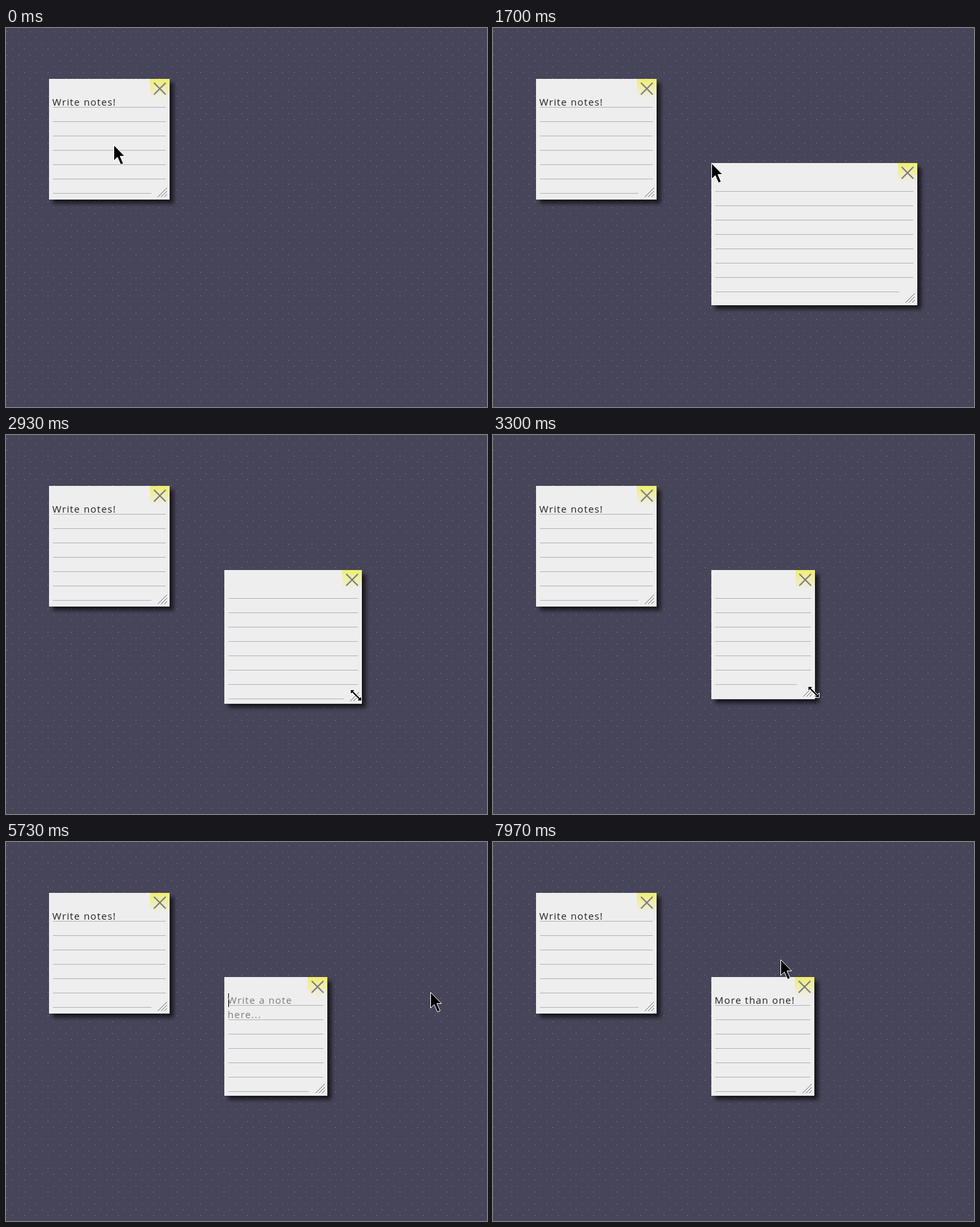
Write an HTML page that moves like this. It is 738 px wide and 581 px high and loops after 8000 ms.

```html
<!DOCTYPE html>
<html lang="en">
<head>
<meta charset="utf-8">
<title>Sticky notes</title>
<style>
  html, body { margin: 0; width: 100%; height: 100%; overflow: hidden; }
  body {
    position: relative;
    background-color: #474559;
    background-image: conic-gradient(#77758a 25%, transparent 0), conic-gradient(#77758a 25%, transparent 0);
    background-image:
      linear-gradient(#7d7b8c, #7d7b8c), linear-gradient(#7d7b8c, #7d7b8c);
    background: #474559;
  }
  #dots, #cursor { position: absolute; left: 0; top: 0; width: 738px; height: 581px; }
  .note {
    position: absolute;
    background: #eee;
    box-shadow: 6px 6px 6px rgba(0, 0, 0, .65);
  }
  .note > * { position: absolute; }
  .rules {
    left: 6px; right: 6px; top: 22px; bottom: 6px;
    background: linear-gradient(transparent 21px, #b3b3bd 21px) 0 0 / 100% 22px;
  }
  .close { right: 0; top: 0; width: 30px; height: 30px; background: linear-gradient(#f0ee70, #eee); }
  .grip { right: 0; bottom: 0; width: 28px; height: 28px; background: #eee; }
  .close path { stroke: #7b7a88; stroke-width: 2; }
  .grip path { stroke: #6f6e7e; stroke-width: 1; }
  .text {
    left: 5px; top: 24px;
    font: 15px/22px "Open Sans", "Noto Sans", sans-serif;
    letter-spacing: 1.15px; white-space: pre; color: #222;
  }
  .hint { color: #7c7c7c; }
  .caret {
    display: inline-block; vertical-align: top;
    width: 1px; height: 21px; margin: 1px -2px 0 1px; background: #000;
  }
</style>
</head>
<body>
<svg id="dots">
  <defs>
    <pattern id="dot" width="18" height="18" patternUnits="userSpaceOnUse">
      <path d="M1 5h1v1h-1zM10 14h1v1h-1z" fill="#858394"/>
    </pattern>
  </defs>
  <rect width="738" height="581" fill="url(#dot)"/>
</svg>

<template id="noteParts">
  <div class="rules"></div>
  <svg class="close"><path d="M6 6L24 24M24 6L6 24"/></svg>
  <svg class="grip"><path d="M10 24L24 10M15 24L24 15M20 24L24 20"/></svg>
  <div class="text"><span class="typed"></span><span class="caret"></span><span class="hint"></span></div>
</template>

<svg id="cursor">
  <g id="pointer">
    <path id="arrow" fill="#000" stroke="#fff"
      d="M.5 .5V24.5L6 19.2L11 30.5L15 28.8L10.2 17.6H17.2Z"/>
    <path id="resize" fill="#000" stroke="#fff"
      d="M-8.5 -8.5H-1.5L-4 -6L6 4L8.5 1.5V8.5H1.5L4 6L-6 -4L-8.5 -1.5Z"/>
    <path id="beam" fill="none" stroke="#000"
      d="M-5 -12.5H-1L.5 -11.5L2 -12.5H6M.5 -11.5V11.5M-5 12.5H-1L.5 11.5L2 12.5H6"/>
  </g>
</svg>

<script>
const LOOP = 8000, STEP = 100 / 3;
const $ = id => document.getElementById(id);

// Cursor moves: start, end, waypoints evenly spaced in time.
const moves = [
  [0, 170, [[165, 179], [204, 219]]],
  [737, 1570, [[204, 219], [240, 262], [310, 310], [365, 322], [376, 290], [358, 235], [335, 207]]],
  [1740, 2370, [[335, 207], [390, 262], [520, 345], [625, 395], [657, 412], [650, 413.4]]],
  [2500, 3300, [[650, 413.4], [602, 409], [545, 401], [502, 391], [492, 394]]],
  [3300, 3330, [[492, 394], [492, 391]]],
  [3330, 4170, [[492, 391], [491, 380], [489, 377.6], [482, 368], [445, 320], [394, 262], [387, 249]]],
  [4840, 5000, [[387, 251], [480, 238], [600, 240], [651, 230]]],
  [7470, 7970, [[651, 230], [610, 212], [550, 185], [490, 166], [455, 166], [441, 180]]]
];

const message = "More than one!";
const keyTimes = [5830, ...Array.from({ length: 11 }, (_, i) => 6130 + 77 * i), 7000, 7270];

const within = (t, a, b) => t >= a && t < b;

function spline(points, u) {
  const last = points.length - 1;
  const i = Math.min(last - 1, Math.floor(u * last));
  const f = u * last - i;
  const at = k => points[Math.max(0, Math.min(last, k))];
  const [a, b, c, d] = [at(i - 1), at(i), at(i + 1), at(i + 2)];
  return [0, 1].map(n => b[n] + f / 2 * (c[n] - a[n]
    + f * (2 * a[n] - 5 * b[n] + 4 * c[n] - d[n]
    + f * (3 * (b[n] - c[n]) + d[n] - a[n]))));
}

function cursorAt(t) {
  const [start, end, points] = moves.filter(m => t >= m[0]).pop();
  return spline(points, Math.min(1, (t - start) / (end - start)));
}

function cursorKind(t) {
  if (within(t, 2900, 3320) || within(t, 3420, 3640)) return "resize";
  if (within(t, 4330, 4465)) return "none";
  if (within(t, 4465, 4890)) return "beam";
  return "arrow";
}

// The dragged corner trails the cursor by one step and stays put on release.
function noteSize(t) {
  if (t < 2530) return [316, 218];
  const [x, y] = cursorAt(Math.min(t, 3640) - STEP);
  return [Math.max(158, Math.round(x + 1 - 335)), Math.round(y + 11.4 - 207)];
}

function makeNote(x, y, w, h) {
  const el = document.createElement("div");
  el.className = "note";
  el.append($("noteParts").content.cloneNode(true));
  document.body.insertBefore(el, $("cursor"));
  const part = name => el.querySelector("." + name);
  const note = { el, typed: part("typed"), caret: part("caret"), hint: part("hint") };
  Object.assign(el.style, { left: x + "px", top: y + "px" });
  resizeNote(note, w, h);
  return note;
}

function resizeNote({ el }, w, h) {
  el.style.width = w + "px";
  el.style.height = h + "px";
}

const show = (el, on) => { el.style.display = on ? "" : "none"; };

const first = makeNote(66, 78, 185, 185);
first.typed.textContent = "Write notes!";
show(first.caret, false);
const second = makeNote(335, 207, 316, 218);
second.hint.textContent = "Write a note\nhere...";

function render(t) {
  const [x, y] = cursorAt(t).map(Math.round);
  $("pointer").setAttribute("transform", `translate(${x} ${y})`);
  const kind = cursorKind(t);
  for (const id of ["arrow", "resize", "beam"]) show($(id), id === kind);

  show(second.el, t >= 1695);
  resizeNote(second, ...noteSize(t));
  second.typed.textContent = message.slice(0, keyTimes.filter(k => t >= k - 4).length);
  show(second.hint, within(t, 4330, 5826));
  show(second.caret, within(t, 4665, 5198) || within(t, 5728, 7800));
}

const begin = performance.now();
function tick() {
  const t = (performance.now() - begin) % LOOP;
  render(Math.floor((t + 3.4) / STEP) * STEP % LOOP);
  requestAnimationFrame(tick);
}
tick();
</script>
</body>
</html>
```
